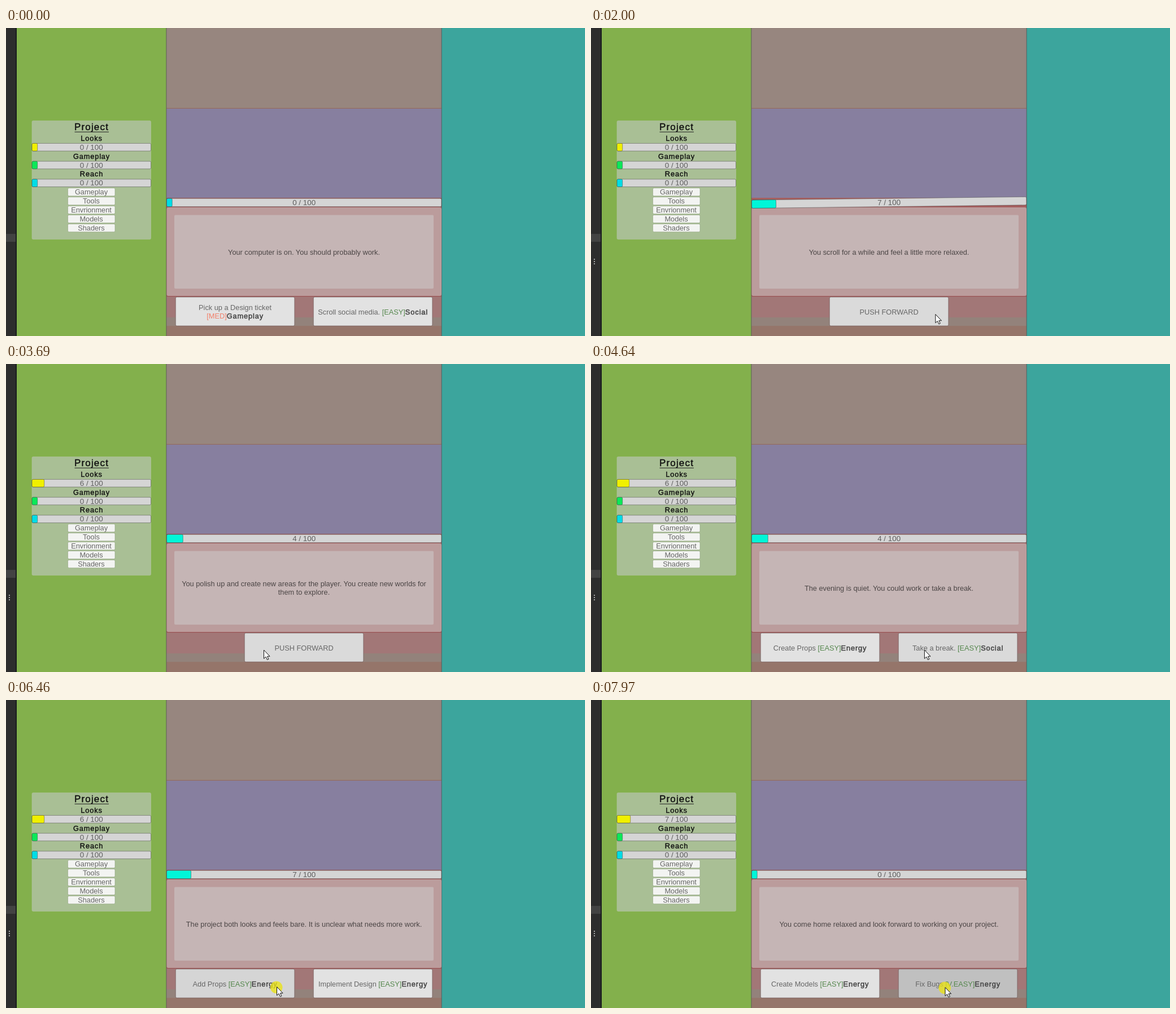
Recreate the animation shown at these times as an HTML page. Size 1025 by 546 pixels, loop 8 s.

```html
<!DOCTYPE html>
<html lang="en">
<head>
<meta charset="utf-8">
<title>Project game</title>
<style>
  html, body { margin: 0; width: 100%; height: 100%; overflow: hidden; }
  svg { display: block; width: 1025px; height: 546px; }
  text { font: 12.75px "Liberation Sans", Arial, sans-serif; text-anchor: middle; fill: #666; }
  .bold { letter-spacing: .07em; fill: #444; stroke: #444; stroke-width: .5px; }
  .head { fill: #111; stroke: #111; stroke-width: .4px; }
  .title { font-size: 17px; }
  .value { font-size: 13.4px; fill: #5f5f5f; }
  .story { fill: #4b4545; }
  .easy { fill: #55874d; }
  .med { fill: #f2806a; }
</style>
</head>
<body>
<svg id="stage" viewBox="0 0 1025 546">
  <rect width="1025" height="546" fill="#2d2d2d"/>
  <rect y="365" width="17" height="14" fill="#434343"/>
  <g id="dots" fill="#c8c8c8">
    <circle cx="6" cy="410" r="1.1"/><circle cx="6" cy="414" r="1.1"/><circle cx="6" cy="418" r="1.1"/>
  </g>
  <rect x="17" width="2" height="546" fill="#191c1e"/>
  <rect x="19" width="265" height="546" fill="#83b04c"/>
  <rect x="771" width="254" height="546" fill="#3ca59d"/>
  <rect x="284" width="487" height="546" fill="#a55f5f"/>
  <rect x="284" width="487" height="142" fill="#97867f"/>
  <rect x="284" y="143" width="487" height="158" fill="#877f9f"/>
  <path d="M284 142.3H771" stroke="#92705f"/>
  <rect x="284" y="476" width="487" height="37" fill="#a27777"/>
  <rect x="284" y="513" width="487" height="15" fill="#93827b"/>
  <rect x="284" y="528" width="487" height="18" fill="#95756a"/>
  <path d="M283.8 0V546M771.2 0V546" stroke="#555" stroke-opacity=".55" stroke-width="1.5"/>
  <rect x="284.5" y="318" width="486.5" height="157" rx="3" fill="#bb9c9c"/>
  <path d="M285 475.7H771" stroke="#984f50"/>
  <rect x="298" y="331.5" width="459" height="130.5" rx="2" fill="#c5b5b5"/>
  <rect x="46" y="164.5" width="210.5" height="210" rx="2" fill="#a9bf95" stroke="#b4c6a3" stroke-width=".6"/>
  <g id="side"></g>
  <g id="bars"></g>
  <g id="story"></g>
  <g id="choices"></g>
  <circle id="spot" r="10.8" fill="#ebe314" fill-opacity=".78"/>
  <path id="cursor" d="M0 0V15.2L3.5 12L6 17.3L8.4 16.2L6 11.2H10.6Z" fill="#fff" stroke="#111"/>
</svg>
<script>
const LOOP = 8000, SHAKE = 240, FOCUS = 1335;
const $ = id => document.getElementById(id);
const PUSH = ['PUSH FORWARD'];

// A line break is "|"; a word after a [tag] is bold.
const scenes = [
  { at: 0, energy: 0, looks: 0, story: 'Your computer is on. You should probably work.',
    choices: ['Pick up a Design ticket|[MED]Gameplay', 'Scroll social media. [EASY]Social'] },
  { at: 1790, energy: 7, looks: 0, story: 'You scroll for a while and feel a little more relaxed.', choices: PUSH },
  { at: 2250, energy: 7, looks: 0, story: "It's the weekend, you are relaxed. It's time to work.",
    choices: ['Work on the Envrionments|[V.EASY]Energy', 'Work on a new Tool [V.EASY]Energy'] },
  { at: 3450, energy: 4, looks: 6, choices: PUSH,
    story: 'You polish up and create new areas for the player. You create new worlds for|them to explore.' },
  { at: 4090, energy: 4, looks: 6, story: 'The evening is quiet. You could work or take a break.',
    choices: ['Create Props [EASY]Energy', 'Take a break. [EASY]Social'] },
  { at: 5110, energy: 7, looks: 6, choices: PUSH,
    story: 'You feel relaxed but not as relaxed but in the back of your mind is your project.' },
  { at: 5560, energy: 7, looks: 6, story: 'The project both looks and feels bare. It is unclear what needs more work.',
    choices: ['Add Props [EASY]Energy', 'Implement Design [EASY]Energy'] },
  { at: 6700, energy: 0, looks: 7, story: 'You add new props and the project looks less bare.', choices: PUSH },
  { at: 7420, energy: 0, looks: 7, story: 'You come home relaxed and look forward to working on your project.',
    choices: ['Create Models [EASY]Energy', 'Fix Bugs [V.EASY]Energy'] }
];

// Mouse down and up times
const presses = [[FOCUS, 1790], [2130, 2250], [3190, 3450], [3980, 4090], [4960, 5110],
  [5440, 5560], [6455, 6700], [7310, 7420], [7940, 8000]];

// Cursor stops: time, x, y
const path = [[760, 703, 543], [1000, 654, 505.5], [1790, 654, 505.5], [2080, 600, 508], [2250, 600, 508],
  [2550, 531, 509], [2680, 531, 509], [2830, 456.5, 507], [4090, 456.5, 507], [4700, 594, 507],
  [5560, 594, 507], [5750, 672, 510], [5770, 672, 510], [5930, 479.5, 508.5], [7420, 479.5, 508.5],
  [7640, 627, 509.5]];

const clamp = v => Math.max(0, Math.min(1, v));
const mix = (a, b, u) => a + (b - a) * u;

function markup(line) {
  return line.replace(/(\[.*?\])(\w+)/, (_, tag, word) =>
    `<tspan class="${tag === '[MED]' ? 'med' : 'easy'}">${tag}</tspan><tspan class="bold">${word}</tspan>`);
}

function label(x, y, str, cls = '') {
  const lines = str.split('|');
  return lines.map((line, i) =>
    `<text class="${cls}" x="${x}" y="${y + 4.5 + (i - (lines.length - 1) / 2) * 14.6}">${markup(line)}</text>`).join('');
}

const rect = (x, y, w, h, fill, more = '') =>
  `<rect x="${x}" y="${y}" width="${w}" height="${h}" rx="2" fill="${fill}" ${more}/>`;

function bar(x, y, w, value, fill, angle = 0) {
  const edge = 'stroke="#333" stroke-opacity=".55" stroke-width=".8"';
  const cx = x + w / 2, h = w > 300 ? 14.5 : 13.5;
  return `<g transform="rotate(${angle} ${cx} ${y})">` +
    rect(x, y - h / 2, w, h, '#d5d5d5', edge) +
    rect(x, y - h / 2, 9.7 + (w - 9.7) * value / 100, h, fill, edge) +
    label(cx, y, value + ' / 100', 'value') + '</g>';
}

function drawSide() {
  const x = 151.5;
  $('side').innerHTML = label(x, 176, 'Project', 'bold head title') +
    '<path d="M121.5 184.3H182" stroke="#222"/>' +
    ['Looks', 'Gameplay', 'Reach'].map((s, i) => label(x, 195.3 + i * 31.8, s, 'bold head')).join('') +
    ['Gameplay', 'Tools', 'Envrionment', 'Models', 'Shaders'].map((s, i) => {
      const y = 290.8 + i * 15.9;
      return rect(109.5, y - 7, 83.5, 14, '#f3f4f2', 'stroke="#8d9f7c" stroke-width=".6"') + label(151, y, s);
    }).join('');
}

function drawBars(t, scene, before) {
  const u = clamp((t - scene.at) / SHAKE);
  const swing = 5.6 * Math.sin(4 * Math.PI * u) * (1 - u);
  const angle = key => before && before[key] !== scene[key] ? swing : 0;
  $('bars').innerHTML =
    bar(46, 211.3, 210.5, scene.looks, '#f0f000', angle('looks')) +
    bar(46, 243, 210.5, 0, '#0ce858') +
    bar(46, 274.8, 210.5, 0, '#00dde6') +
    bar(284.5, 309.4, 486.3, scene.energy, before ? '#00f6d8' : '#00dde6', angle('energy'));
}

const slots = n => n === 1 ? [422.3] : [300.3, 544.3];

function drawScene(scene) {
  $('story').innerHTML = label(527.5, 397, scene.story, 'story');
  $('choices').innerHTML = slots(scene.choices.length).map((x, i) =>
    rect(x, 477, 210.5, 51, '#e2e2e2', 'stroke="#6b5656" stroke-width=".6"') +
    label(x + 105.3, 503, scene.choices[i])).join('');
}

function cursorAt(t) {
  const i = path.findIndex(p => p[0] > t);
  if (i <= 0) return path[i < 0 ? path.length - 1 : 0].slice(1);
  const [a, b] = [path[i - 1], path[i]];
  const u = clamp((t - a[0]) / (b[0] - a[0])), e = u * u * (3 - 2 * u);
  return [mix(a[1], b[1], e), mix(a[2], b[2], e)];
}

let shown;
function frame() {
  const t = performance.now() % LOOP;
  const index = scenes.findLastIndex(s => s.at <= t), scene = scenes[index];
  if (shown !== index) drawScene(scene);
  shown = index;
  drawBars(t, scene, scenes[index - 1]);

  const [x, y] = cursorAt(t);
  const press = presses.find(p => t >= p[0] && t < p[1]);
  const down = press ? clamp((t - press[0]) / 55) : 0;
  $('choices').querySelectorAll('rect').forEach((r, i) => {
    const left = slots(scene.choices.length)[i];
    const over = t >= FOCUS && x > left && x < left + 210.5;
    const grey = over ? Math.round(mix(218, 172, down)) : 226;
    r.setAttribute('fill', `rgb(${grey},${grey},${grey})`);
  });

  $('cursor').setAttribute('transform', `translate(${x} ${y})`);
  $('spot').setAttribute('transform', `translate(${x - 0.8} ${y + 0.8})`);
  $('cursor').style.display = t < path[0][0] ? 'none' : '';
  $('spot').style.display = press ? '' : 'none';
  $('dots').style.display = t < scenes[1].at ? 'none' : '';
  requestAnimationFrame(frame);
}

drawSide();
frame();
</script>
</body>
</html>
```
